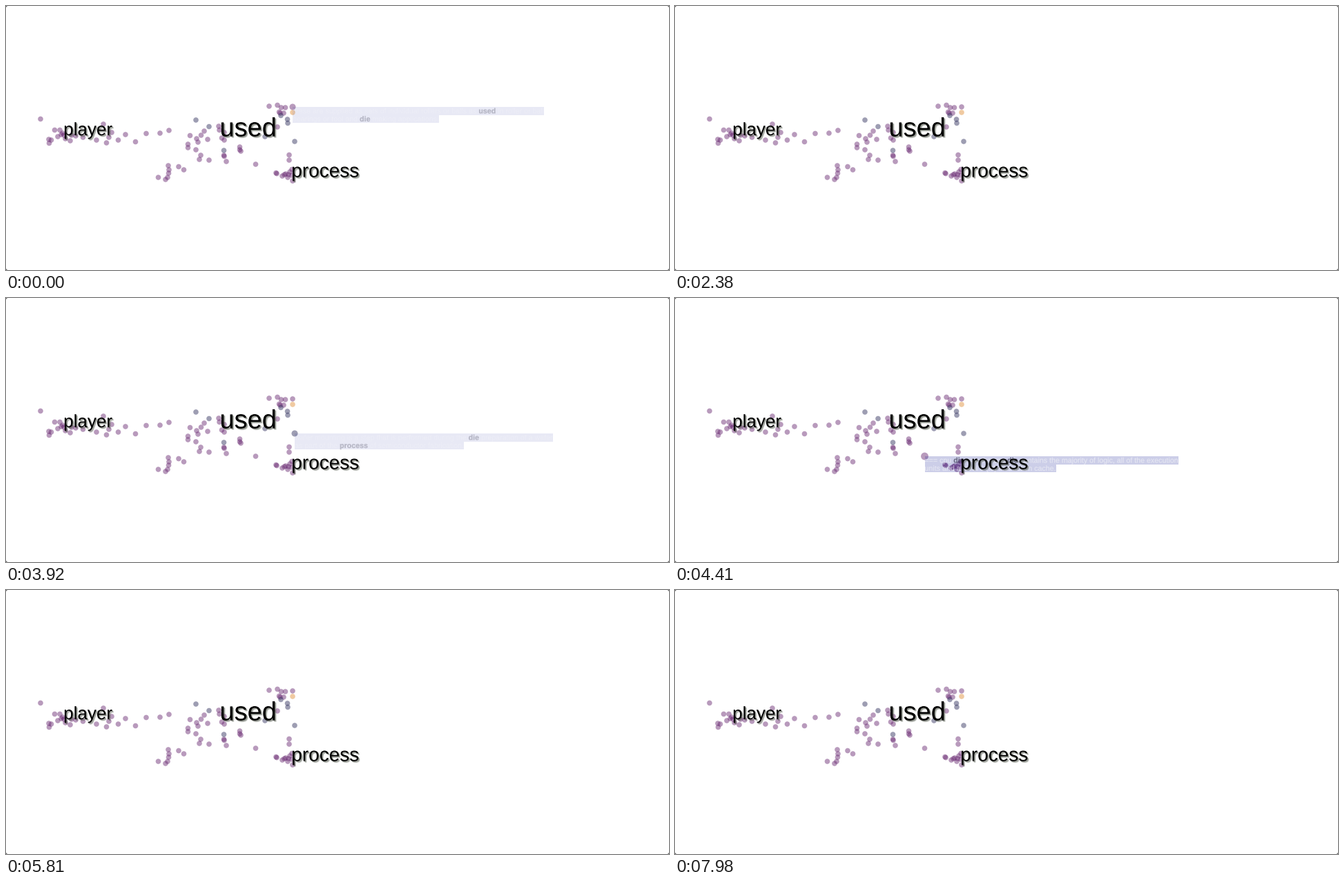
Recreate the animation shown at these times as a matplotlib script. Size 960 by 382 pixels, loop 8 s.

```python
import matplotlib.pyplot as plt
from matplotlib.animation import FuncAnimation
from matplotlib.patches import FancyBboxPatch, PathPatch, Rectangle
from matplotlib.path import Path
from matplotlib.textpath import TextPath
from matplotlib.transforms import Affine2D

W, H, DPI = 960, 382, 100
LOOP, TICK, STEP = 8000, 20, 70      # ms: loop, drawing interval, motion step
R_DOT, R_GROW = 3.8, 3.7
FONT, LINE, ASCENT = 10.65, 11.6, 9.4
BOX = (0.10, 0.14, 0.60)
BOX_ALPHA = 0.5

PURPLE, SLATE, ORANGE = "#6b2c74", "#32325f", "#e0913c"

PLAYER = [
    (50, 163.5), (70.5, 179.5), (78, 179.5), (62, 193), (65.5, 194),
    (62.5, 198.5), (75, 189), (80, 186), (82, 184), (84, 187), (86, 192),
    (93, 195), (95, 187), (101, 188), (111.5, 190), (131, 194), (141, 171),
    (145.5, 198), (149, 190), (153, 183), (162.5, 194), (173, 186),
    (187.5, 196.5), (203, 184.5), (223, 184), (236, 180),
]
MIDDLE = [
    (287, 181), (282.5, 187), (266.5, 187.5), (276, 192), (278, 197),
    (292, 193), (263.5, 200), (263.5, 205), (275, 208), (282, 216),
    (280, 222), (294, 223), (308, 174), (309, 179.5), (312.5, 191),
    (316, 183), (316, 194), (315.5, 216), (316, 217.5), (319, 225),
    (338.5, 204), (338.5, 208), (340, 210), (361.5, 229),
    (220.5, 248), (231, 251), (234, 248), (235.5, 242), (235, 231),
    (236, 237), (250, 232.5), (257.5, 237),
]
RIGHT = [
    (381, 145), (393, 143.5), (398.5, 147), (404.5, 147), (395.5, 153.5),
    (397, 155), (402, 155), (415, 146), (393, 175), (410, 215.5), (410, 223),
    (391, 241.5), (392, 242.5), (400, 246), (403, 244), (405, 243),
    (408, 248), (409, 244), (411, 240), (414, 236.5), (414, 245), (415, 253),
]
BLUISH = [
    (275, 165), (294, 174.5), (315.5, 209), (375, 189), (398, 158.5),
    (407.5, 164), (408, 169.5), (418, 196),
]
PURPLES = PLAYER + MIDDLE + RIGHT
DOTS = PURPLES + BLUISH + [(415, 154)]
COLORS = [PURPLE] * len(PURPLES) + [SLATE] * len(BLUISH) + [ORANGE]

# word, x, baseline, size
LABELS = [("player", 83.2, 187, 26), ("used", 309.4, 188.5, 38),
          ("process", 413.2, 247.5, 28)]

# anchor dot, fade-in start, fade-out start, lines with *bold* parts
SENTENCES = [
    ((415, 146), -1500, -210, [
        "these are supplied as sets of individual rollers or balls as *used* in roller or ball",
        "bearings or tool and *die* making applications."]),
    ((408, 169.5), 560, 1820, [
        "*used* for *die* attachment of e.g. gaas dies."]),
    ((418, 196), 2520, 3710, [
        "wafer mounting is a step that is performed during the *die* preparation of a wafer",
        "as part of the *process* of semiconductor fabrication."]),
    ((361.5, 229), 4410, 5530, [
        "=== cpu *die* === the cpu *die* contains the majority of logic, all of the execution",
        "units and a level 0 (l0) instruction cache."]),
    ((62.5, 198.5), 6090, 7350, [
        "t *his* metaphor comes from gambling with dice: once the *die* or dice have been",
        "thrown, all bets are irrevocable, even before the dice have come to rest."]),
]


def glyphs(text, size, bold=False):
    prop = dict(family="Liberation Sans", weight="bold" if bold else "normal")
    return TextPath((0, 0), text, size=size, prop=prop)


def advance(text, size, bold):
    """Width of text including its outer spaces."""
    framed = glyphs("|" + text + "|", size, bold).get_extents().width
    return framed - glyphs("||", size, bold).get_extents().width


def place(path, x, y):
    return Affine2D().scale(1, -1).translate(x, y).transform_path(path)


class Sentence:
    def __init__(self, ax, anchor, start, end, lines):
        self.dot = DOTS.index(anchor)
        self.start, self.end = start, end
        x0, y0 = anchor
        runs = {False: [], True: []}
        self.boxes = []
        for row, line in enumerate(lines):
            x, y = x0, y0 + row * LINE
            for i, part in enumerate(line.split("*")):
                if not part:
                    continue
                bold = i % 2 == 1
                # leading spaces are skipped by hand to keep the pen position
                lead = len(part) - len(part.lstrip())
                x += lead * 0.278 * FONT
                part = part.lstrip()
                if part:
                    runs[bold].append(place(glyphs(part, FONT, bold), x, y + ASCENT))
                    x += advance(part, FONT, bold)
            box = Rectangle((x0, y), x - x0, LINE, fc=BOX, lw=0, zorder=3)
            self.boxes.append(ax.add_patch(box))
        self.texts = []
        for bold, color in ((False, "white"), (True, "#04041c")):
            if runs[bold]:
                path = Path.make_compound_path(*runs[bold])
                patch = PathPatch(path, fc=color, ec=color, lw=0.15, zorder=4)
                self.texts.append(ax.add_patch(patch))

    def fade(self, t):
        if t < self.start:
            return 0.0
        if t < self.end:
            u = min(1, (t - self.start + STEP) / (4 * STEP))
            return 1 - (1 - u) ** 2
        return max(0, 1 - (t - self.end + STEP) / (5 * STEP))

    def show(self, t):
        a = self.fade(t)
        for artist in self.boxes + self.texts:
            artist.set_visible(a > 0)
        for box in self.boxes:
            box.set_alpha(BOX_ALPHA * a)
        for text in self.texts:
            text.set_alpha(a)
        return a


def add_label(ax, word, x, y, size):
    path = glyphs(word, size)
    for d, alpha in ((2.4, 0.14), (2, 0.22), (1.5, 0.25), (1, 0.25)):
        ax.add_patch(PathPatch(place(path, x + d, y + d), fc="#4a5044",
                               lw=0, alpha=alpha, zorder=5))
    ax.add_patch(PathPatch(place(path, x, y), fc="black", lw=0, zorder=6))


def dot_area(r):
    return (2 * r * 72 / DPI) ** 2


fig = plt.figure(figsize=(W / DPI, H / DPI), dpi=DPI, facecolor="#555555")
ax = fig.add_axes([0, 0, 1, 1])
ax.set_xlim(0, W)
ax.set_ylim(H, 0)
ax.axis("off")
ax.add_patch(FancyBboxPatch((0, 0), W, H, fc="white", lw=0, zorder=0,
                            boxstyle="round,pad=0,rounding_size=3"))

dots = ax.scatter(*zip(*DOTS), s=[dot_area(R_DOT)] * len(DOTS), c=COLORS,
                  alpha=0.48, linewidths=0, zorder=2)
sentences = [Sentence(ax, *spec) for spec in SENTENCES]
for label in LABELS:
    add_label(ax, *label)


def update(i):
    t = (i * TICK + TICK // 2) // STEP * STEP
    radii = [R_DOT] * len(DOTS)
    for s in sentences:
        radii[s.dot] += R_GROW * s.show(t)
    dots.set_sizes([dot_area(r) for r in radii])
    return [dots]


anim = FuncAnimation(fig, update, frames=LOOP // TICK, interval=TICK,
                     repeat=True, repeat_delay=0, blit=False)
plt.show()
```
